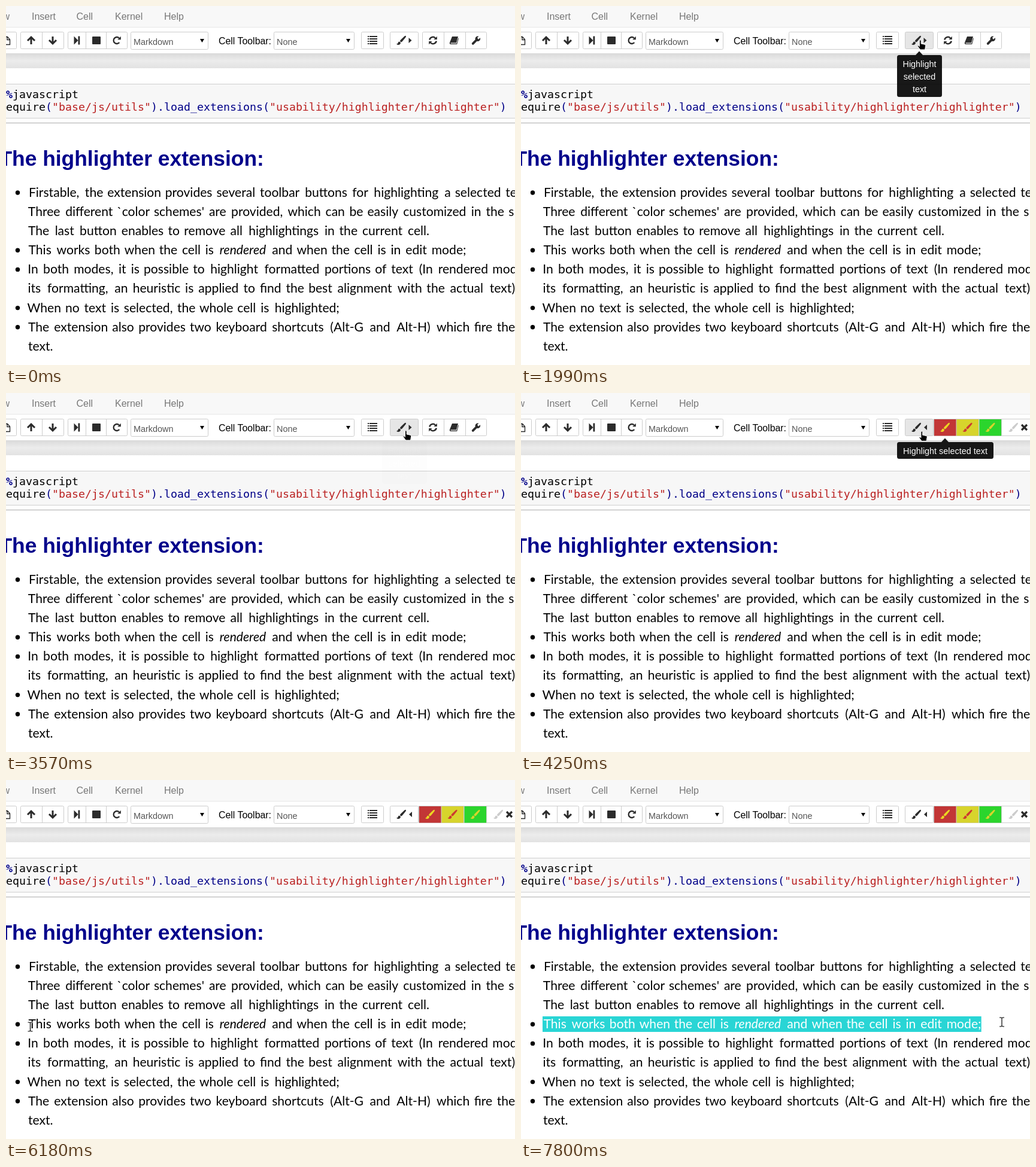
These frames come from a looping animation (850 by 600 pixels, 8000 ms). An HTML page:

```html
<!DOCTYPE html>
<html lang="en">
<head>
<meta charset="utf-8">
<title>Highlighter demo</title>
<style>
html, body { margin: 0; width: 100%; height: 100%; overflow: hidden; background: #fff; }
svg { display: block; width: 850px; height: 600px; }
.ui { font: 16px "Liberation Sans", Arial, sans-serif; }
.menu { fill: #777; }
.pick { font-size: 14.4px; fill: #555; }
.tip { font-size: 14.4px; fill: #fff; text-anchor: middle; }
.code { font: 18.27px "DejaVu Sans Mono", monospace; }
.head { font: bold 35.4px "Liberation Sans", Arial, sans-serif; fill: #00008b; }
.body { font: 21.1px Lato, sans-serif; text-anchor: middle; }
.btn { fill: #fff; stroke: #ccc; }
.icon { fill: #2b2b2b; }
.line { fill: none; stroke: #2b2b2b; }
</style>
</head>
<body>
<svg id="stage" viewBox="0 0 850 600" xmlns="http://www.w3.org/2000/svg"></svg>
<script>
const LOOP = 8000;

// Advance widths of the body typeface, in thousandths of an em
const SIZE = 22.92, LEFT = 36;
const advance = { " ": 333 };
const setAdvance = (chars, list) => [...chars].forEach((c, i) => advance[c] = list[i]);
setAdvance("abcdefghijklmnopqrstuvwxyz", [481, 517, 444, 517, 444, 306, 500, 517, 239, 267, 489, 239, 794,
  517, 500, 517, 517, 342, 383, 361, 517, 461, 683, 461, 461, 435]);
setAdvance("FTIWGHA-(),.;`'", [569, 667, 278, 944, 667, 708, 667, 333, 389, 389, 278, 278, 278, 278, 278]);
const widthOf = s => [...s].reduce((w, c) => w + advance[c], 0) * SIZE / 1000;

const lines = [
  "Firstable, the extension provides several toolbar buttons for highlighting a selected text.",
  "Three different `color schemes' are provided, which can be easily customized in the s",
  "The last button enables to remove all highlightings in the current cell.",
  "This works both when the cell is rendered and when the cell is in edit mode;",
  "In both modes, it is possible to highlight formatted portions of text (In rendered mode,",
  "its formatting, an heuristic is applied to find the best alignment with the actual text)",
  "When no text is selected, the whole cell is highlighted;",
  "The extension also provides two keyboard shortcuts (Alt-G and Alt-H) which fire the",
  "text."
];
const PICKED = 3;
const lineMid = i => 311.5 + 32.1 * i;

function bodyLine(i) {
  let x = LEFT, out = "";
  for (const word of lines[i].split(" ")) {
    const w = widthOf(word);
    const slant = i === PICKED && word === "rendered" ? ' font-style="italic"' : "";
    out += `<text x="${(x + w / 2).toFixed(2)}" y="${(lineMid(i) + 7.4).toFixed(1)}"${slant}>${word}</text>`;
    x += w + widthOf(" ");
  }
  return out;
}

const rect = (x, y, w, h, attrs) => `<rect x="${x}" y="${y}" width="${w}" height="${h}" ${attrs}/>`;
const text = (x, y, s, attrs = "") => `<text x="${x}" y="${y}" ${attrs}>${s}</text>`;
const at = (x, y, inner) => `<g transform="translate(${x} ${y})">${inner}</g>`;
const shape = (d, attrs = 'class="icon"') => `<path d="${d}" ${attrs}/>`;
const line = (d, w) => shape(d, `class="line" stroke-width="${w}"`);

// A button group given by its left edge, inner dividers and right edge
function group(...edges) {
  const x = edges[0], end = edges[edges.length - 1];
  return rect(x + .5, 43.5, end - x - 1, 28, 'rx="2" class="btn"') +
    edges.slice(1, -1).map(d => rect(d, 44, 1, 27, 'fill="#ccc"')).join("");
}

const picker = (x, w, label) => rect(x + .5, 43.5, w - 1, 29, 'rx="2" class="btn"') +
  text(x + 5, 65, label, 'class="pick"') +
  shape(`M${x + w - 14} 55h7l-3.5 6z`, 'fill="#000"');

const brush = (x, fill) => at(x, 49.5, shape(
  "M15.6.4c.8.7.3 1.6-.3 2.6L10 9.6C9.3 10.4 8.4 11 7.5 11L5.9 9.3C6 8.3 6.6 7.4 7.4 6.7L13.7.8C14.4.2 15.1 0 15.6.4Z" +
  "M5 9.9 7 11.8c0 2.4-1.7 3.6-4 3.6-1.5 0-2.5-.6-3-1.9 1.4.6 2.1.1 2.6-1.4C3 10.7 3.8 9.9 5 9.9Z",
  `fill="${fill}"`));

const arrowUp = line("M-6 1 0-5 6 1M0-4.5V7", 3);
const halfTurn = line("M-5.7-1A5.7 5.7 0 0 1 4-4", 2.4) + shape("M6.8-6.8v5.4H1.4Z");
const rows = [51, 55, 59, 63].map(y => rect(604, y - 1, 2, 2, 'class="icon"') + rect(607, y - 1, 13, 2, 'class="icon"')).join("");

const toolbar =
  group(-20, 18) + line("M-4 51.5H2.5L6.5 56V64.5H-4M2 51.5V56.5H6.5", 1.4) +
  group(24, 60, 97) + at(42, 57, arrowUp) + at(78, 58, `<g transform="scale(1 -1)">${arrowUp}</g>`) +
  group(103, 133, 167, 203) +
  shape("M113.500 50.500 120.500 57.500 113.500 64.500ZM120.500 50.500h2.800v14h-2.800Z") +
  rect(144, 51, 14, 13, 'rx="1" class="icon"') +
  at(185, 57.5, line("M4.300 3.600A5.500 5.500 0 1 1 3.800-4.100", 2.3) + shape("M6.800-6.800v5.600H1.200Z")) +
  picker(208, 130, "Markdown") + text(355, 64, "Cell Toolbar:", 'font-size="15.9"') +
  picker(447, 135, "None") +
  group(593, 631) + rows;

const tools = group(695, 731, 767, 803) +
  at(713, 57.5, halfTurn + `<g transform="rotate(180)">${halfTurn}</g>`) +
  at(748, 57.5, shape("M-3-6.500H7L4 4H-5.500C-6 4.500-5.500 5.200-5 5.200H4.500L7.200-4 8-3.500 5.200 6.500H-5.500C-7 6.500-7.600 5-7 3.500Z") +
    line("M-1.500-3.500H4.500M-2.300-1H3.700", 0).replaceAll("#2b2b2b", "#fff")) +
  at(785, 57.5, line("M-5.300 5.300 2-2", 3.8).replace("<path", '<path stroke-linecap="round"') +
    '<circle cx="2.800" cy="-2.800" r="4.300" class="icon"/>' +
    shape("M3-3 7.500-7.500", 'stroke="#fff" stroke-width="3.2"'));

const swatch = (x, fill, ink) => rect(x, 44, 36.5, 27.5, `fill="${fill}"`) + brush(x + 10, ink);
const palette = rect(689, 43, 170, 29, 'fill="#ccc"') +
  swatch(690, "#c23636", "#ecd722") + swatch(727.5, "#d7d42c", "#cc3a30") + swatch(765.5, "#2bd52d", "#d7d42c") +
  rect(803, 44, 60, 27, 'fill="#fff"') + brush(814, "#ccc") + line("M836 53 845 62M845 53 836 62", 3.2);

const tipNarrow = shape("M659 82 665 75.500 671 82Z", 'fill="#000"') + rect(628, 82, 75, 70, 'rx="3.500" fill="#000"') +
  ["Highlight", "selected", "text"].map((s, i) => text(665.5, 102 + 21 * i, s, 'class="tip"')).join("");
const tipWide = shape("M702 82 708 75.500 714 82Z", 'fill="#000"') + rect(628, 82, 161, 28, 'rx="3.500" fill="#000"') +
  text(708.5, 102, "Highlight selected text", 'class="tip"');

const span = (s, fill, more = "") => `<tspan fill="${fill}" ${more}>${s}</tspan>`;
const NAVY = "#000088", RED = "#ba2121";
const beam = "M-4-7.500H-1.500L0-6.500 1.500-7.500H4M-4 7.500H-1.500L0 6.500 1.500 7.500H4M0-6.500V6.500";
const solid = 'fill="#000" stroke="#fff" stroke-linejoin="round"';

document.getElementById("stage").innerHTML = `
<defs>
  <linearGradient id="shade" x2="0" y2="1">
    <stop offset="0" stop-color="#d9d9d9"/><stop offset=".5" stop-color="#ececec"/><stop offset="1" stop-color="#e2e2e2"/>
  </linearGradient>
  <clipPath id="clip"><rect id="range" x="${LEFT}" y="395" width="0" height="26"/></clipPath>
</defs>
${rect(0, 0, 850, 600, 'fill="#fff"')}
${rect(0, 0, 850, 36, 'fill="#f8f8f8"')}${rect(0, 35, 850, 1, 'fill="#e7e7e7"')}
${rect(0, 79, 850, 25, 'fill="url(#shade)"')}
<g class="ui">
  <g class="menu">${text(6, 23, "View", 'text-anchor="end"')}${text(43, 23, "Insert")}${text(117.5, 23, "Cell")}${text(182, 23, "Kernel")}${text(264, 23, "Help")}</g>
  ${toolbar}
  <g id="tools">${tools}</g>
  <rect id="toggle" x="641.5" y="43.5" width="47" height="28" rx="2" class="btn"/>
  ${brush(652, "#2b2b2b")}<path id="caret" class="icon"/>
  <g id="palette">${palette}</g>
</g>
${rect(-5, 130.5, 870, 57, 'fill="#f7f7f7" stroke="#cfcfcf"')}
<g class="code">
  ${text(-11, 154, span("%%", NAVY, 'font-weight="bold"') + span("javascript", "#000"))}
  ${text(-11, 175, span("require", "#000") + span("(", NAVY) + span('"base/js/utils"', RED) +
    span(").load_extensions(", NAVY) + span('"usability/highlighter/highlighter"', RED) + span(")", NAVY))}
</g>
${rect(0, 195, 850, 1, 'fill="#ababab"')}
${text(-11.6, 267, "The highlighter extension:", 'class="head"')}
${[0, 3, 4, 6, 7].map(i => `<circle cx="19.500" cy="${lineMid(i) + .5}" r="3.700"/>`).join("")}
<g class="body">${lines.map((_, i) => bodyLine(i)).join("")}</g>
<g class="body" clip-path="url(#clip)" fill="#fff">${rect(LEFT, 395, 800, 26, 'fill="#29d5d5"')}${bodyLine(PICKED)}</g>
<g id="tip" class="ui"><g id="narrow">${tipNarrow}</g><g id="wide">${tipWide}</g></g>
<g id="cursor">
  <g id="arrow">${shape("M0 0V15.500L3.600 12.200 6.200 18 8.600 17 6.100 11.300H11Z", solid)}</g>
  <g id="hand">${shape("M-1.600 1C-1.600-.6 1.200-.6 1.200 1V6L7 7.200C8.400 7.600 8.800 8.400 8.600 9.800L7.600 16H-.4L-4.400 10.600C-4.800 9.200-3.600 8.600-2.600 9.600L-1.600 10.600Z", solid)}</g>
  <g id="beam">${shape(beam, 'fill="none" stroke="#fff" stroke-width="2.600"')}${shape(beam, 'fill="none" stroke="#000" stroke-width="1.200"')}</g>
</g>`;

// Pointer hot spot: time, x, y
const path = [
  [590, 457, 425], [750, 610, 392], [910, 742, 300], [1030, 780, 205], [1190, 735, 110], [1300, 685, 72],
  [1390, 660, 60], [1470, 667, 57], [2730, 667, 57], [2850, 658, 68], [2930, 653, 72], [3050, 648, 83],
  [3250, 655, 80], [3400, 663, 68], [3570, 668, 63], [4210, 668, 63], [4250, 670, 64], [4400, 600, 115],
  [4600, 420, 222], [4800, 250, 312], [5050, 118, 362], [5130, 108, 360], [5250, 85, 350], [5400, 62, 336],
  [5600, 52, 365], [5750, 45, 395], [5890, 41, 413], [5970, 40.5, 412.5], [6280, 40.5, 412.5],
  [6840, 337, 403], [7120, 427, 404], [7800, 803, 404.5]
];
// Tooltip fade: time, opacity
const fade = [[1830, 0], [1990, 1], [2880, 1], [3030, 0], [3570, 0], [3730, 1], [4290, 1], [4450, 0]];
const OPEN = 3610, WIDEN = 3650, BLUR = 6180, DRAG = 6300;

function sample(keys, t, col = 1) {
  const i = keys.findIndex(k => k[0] > t);
  if (i === 0) return keys[0][col];
  if (i < 0) return keys[keys.length - 1][col];
  const a = keys[i - 1], b = keys[i];
  return a[col] + (b[col] - a[col]) * (t - a[0]) / (b[0] - a[0]);
}

const picked = lines[PICKED];
const stops = Array.from({ length: picked.length + 1 }, (_, i) => LEFT + widthOf(picked.slice(0, i)));
const snap = x => stops.reduce((a, b) => Math.abs(b - x) < Math.abs(a - x) ? b : a);

const overButton = (x, y) => x > 641 && x < 689 && y > 43 && y < 72;
const overText = (x, y) => (y > 130 && y < 187) || (y > 236 && y < 274 && x < 428) ||
  lines.some((s, i) => Math.abs(y - lineMid(i)) < 13 && x >= LEFT && x <= LEFT + widthOf(s));

const el = id => document.getElementById(id);
const show = (id, on) => el(id).style.display = on ? "" : "none";

function draw(t) {
  const x = sample(path, t), y = sample(path, t, 2);
  const moving = t >= path[0][0], open = t >= OPEN;
  const hover = moving && overButton(x, y);
  const kind = hover ? "hand" : t >= DRAG || overText(x, y) ? "beam" : "arrow";

  show("cursor", moving);
  ["arrow", "hand", "beam"].forEach(id => show(id, id === kind));
  el("cursor").setAttribute("transform", `translate(${x.toFixed(1)} ${y.toFixed(1)})`);

  el("toggle").style.fill = hover || (open && t < BLUR) ? "#e6e6e6" : "#fff";
  el("caret").setAttribute("d", open ? "M678 53V62L673 57.500Z" : "M672.500 53V62L677.500 57.500Z");
  show("tools", !open);
  show("palette", open);

  el("tip").setAttribute("opacity", .9 * sample(fade, t));
  show("narrow", t < WIDEN);
  show("wide", t >= WIDEN);

  const end = t < DRAG ? LEFT : snap(sample(path, t - 20));
  el("range").setAttribute("width", end - LEFT);
}

const start = performance.now();
function tick() {
  draw((performance.now() - start) % LOOP);
  requestAnimationFrame(tick);
}
tick();
</script>
</body>
</html>
```
